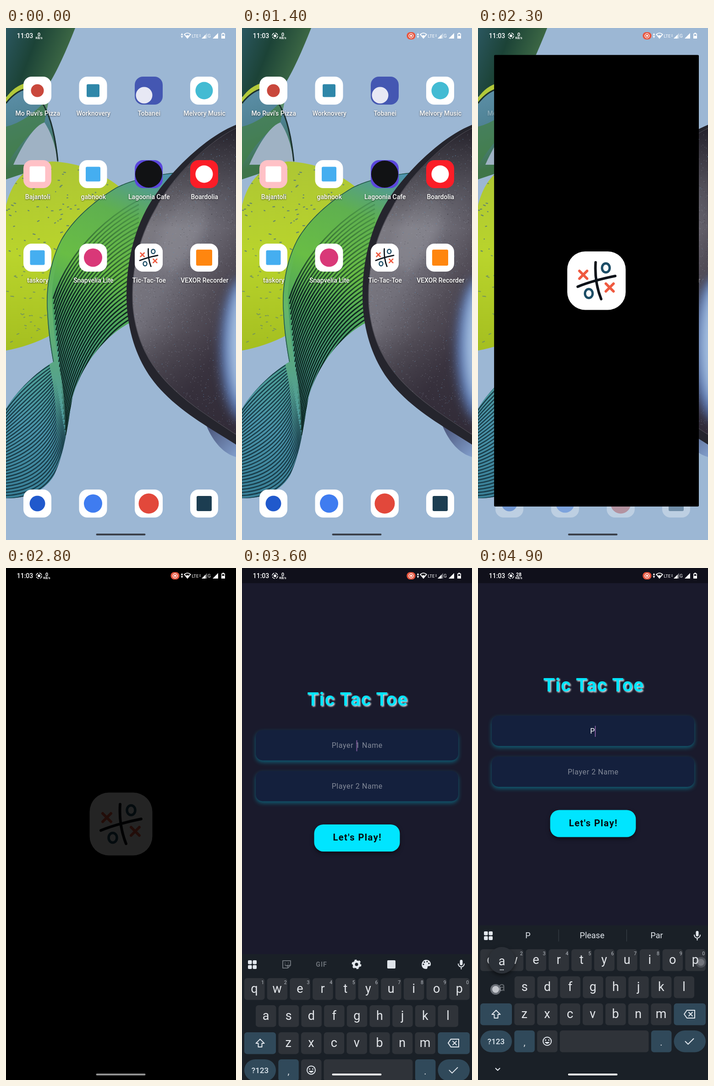
Recreate the animation shown at these times as an HTML page. Size 502 by 1116 pixels, loop 5 s.

```html
<!DOCTYPE html>
<html lang="en">
<head>
<meta charset="utf-8">
<title>Phone screen</title>
<style>
html, body { margin: 0; width: 100%; height: 100%; overflow: hidden; background: #000; }
svg { display: block; width: 502px; height: 1116px; font-family: Roboto, "Noto Sans", sans-serif; }
text { text-anchor: middle; }
.label { font-size: 14px; font-weight: 500; fill: #fff; filter: drop-shadow(0 1px 1.5px rgba(0,0,0,.65)); }
.hint { font-size: 16px; letter-spacing: .6px; fill: #838a99; }
.title { font-size: 40px; font-weight: 700; letter-spacing: 1.6px; filter: drop-shadow(2.5px 2.5px 1.5px rgba(255,255,255,.85)); }
.glow { filter: drop-shadow(0 4px 5px rgba(0,190,220,.42)); }
.raised { filter: drop-shadow(0 4px 4px rgba(0,0,0,.5)); }
.key { font-size: 27px; fill: #e3e6ea; }
.line { fill: none; stroke: #e3e8ee; stroke-width: 2; stroke-linejoin: round; stroke-linecap: round; }
.dim { opacity: .4; }
</style>
</head>
<body>
<svg id="stage" viewBox="0 0 502 1116"></svg>
<script>
const stage = document.getElementById('stage');
const LOOP = 5000, STEP = 100;
const COLS = [68.5, 190, 311.5, 432.5];
const KB_TOP = 779, KB_HEIGHT = 337, NAV_TOP = 1091;

const clamp = v => Math.min(1, Math.max(0, v));
const mix = (a, b, p) => a + (b - a) * p;
const span = (t, from, to) => clamp((t - from) / (to - from));
const easeOut = p => 1 - (1 - p) ** 3;
const range = (n, f) => Array.from({ length: n }, (_, i) => f(i));

let seed = 11;
const rand = () => (seed = (seed * 16807) % 2147483647) / 2147483647;

const rect = (x, y, w, h, r, fill, extra = '') =>
  `<rect x="${x}" y="${y}" width="${w}" height="${h}" rx="${r}" fill="${fill}" ${extra}/>`;
const circle = (x, y, r, fill, extra = '') =>
  `<circle cx="${x}" cy="${y}" r="${r}" fill="${fill}" ${extra}/>`;
const ellipse = (x, y, rx, ry, fill, extra = '') =>
  `<ellipse cx="${x}" cy="${y}" rx="${rx}" ry="${ry}" fill="${fill}" ${extra}/>`;
const path = (d, fill, extra = '') => `<path d="${d}" fill="${fill}" ${extra}/>`;
const stroke = (d, color, width, extra = '') =>
  `<path d="${d}" fill="none" stroke="${color}" stroke-width="${width}" ${extra}/>`;
const line = (d, extra = '') => `<path class="line" d="${d}" ${extra}/>`;
const text = (x, y, s, cls = '', extra = '') => `<text x="${x}" y="${y}" class="${cls}" ${extra}>${s}</text>`;
const group = (id, body, extra = '') => `<g id="${id}" ${extra}>${body}</g>`;
const gradient = (id, x1, y1, x2, y2, ...colors) =>
  `<linearGradient id="${id}" gradientUnits="userSpaceOnUse" x1="${x1}" y1="${y1}" x2="${x2}" y2="${y2}">` +
  colors.map((c, i) => `<stop offset="${i / (colors.length - 1)}" stop-color="${c}"/>`).join('') +
  '</linearGradient>';
const clip = (id, d) => `<clipPath id="${id}"><path d="${d}"/></clipPath>`;

// Short dashes scattered over a box, joined in one path
const specks = (n, x, y, w, h, size) => range(n, () => {
  const s = size * (.5 + rand());
  return `M${(x + rand() * w).toFixed(1)} ${(y + rand() * h).toFixed(1)}l${s.toFixed(1)} ${((rand() - .5) * s).toFixed(1)}`;
}).join('');

function wallpaper() {
  const lime = 'M0 388C10 345 35 298 100 291C160 293 210 315 255 352L255 600L100 668C70 685 30 698 0 703Z';
  const crest = 'M372 315C320 320 270 332 240 348C190 378 145 418 120 462C95 510 86 570 90 620C92 665 98 700 103 728';
  const ribbon = crest + 'C65 750 20 795 0 830L0 1025C45 1026 85 1010 105 975C128 925 134 870 145 805C160 750 205 675 275 640L330 400Z';
  const shell = 'M502 211C430 240 345 325 306 396C272 460 259 540 264 610C270 688 300 752 345 796C390 842 450 875 502 908Z';
  const face = 'M502 219C440 249 361 327 326 395C288 460 272 535 277 608C284 683 314 735 356 777C400 822 455 854 502 886Z';

  const upper = range(28, i => {
    const u = i / 27;
    return `M290 ${mix(375, 634, u)}C${mix(215, 205, u)} ${mix(415, 672, u)} ${mix(135, 152, u)} ${mix(490, 775, u)} ${mix(103, 131, u)} ${mix(590, 900, u)}`;
  }).join('');
  const lower = range(30, i => {
    const u = i / 29;
    return `M${mix(103, 130, u)} ${mix(730, 890, u)}C${mix(70, 120, u)} ${mix(750, 975, u)} ${mix(25, 80, u)} ${mix(785, 1025, u)} -4 ${mix(832, 1026, u)}`;
  }).join('');

  return `<defs>
    ${gradient('topLeaf', 0, 0, 130, 50, '#2b5760', '#1c4337', '#3b6644')}
    ${gradient('blueLeaf', 20, 140, 70, 290, '#5b8ea6', '#4d8091', '#3f7549')}
    ${gradient('limeFill', 60, 290, 60, 700, '#adc634', '#b9d42c', '#a5bf20')}
    ${gradient('ribbonFill', 350, 310, 60, 1010, '#4c91b4', '#5fb04f', '#69bd45', '#479f62', '#4d9f95', '#4a93a9', '#3b8198')}
    ${gradient('stripe', 290, 400, 230, 610, '#1c552b44', '#173f2699', '#0e2822')}
    ${gradient('edge', 100, 450, 100, 920, '#62b95100', '#66b768', '#56a38a', '#4d9aa000')}
    ${gradient('shellFill', 280, 500, 500, 650, '#7b7981', '#72707a', '#544f59', '#3f3844')}
    ${gradient('shellShade', 400, 215, 400, 880, '#24212a', '#24212a00', '#24212a00', '#2b2532aa')}
    ${gradient('drop', 440, 870, 502, 930, '#4c577c', '#7f9bc8')}
    ${clip('limeClip', lime)}${clip('ribbonClip', ribbon)}${clip('shellClip', face)}
    <filter id="soft" x="-60%" y="-30%" width="220%" height="160%"><feGaussianBlur stdDeviation="11"/></filter>
  </defs>` +
    rect(0, 0, 502, 1116, 0, '#9cb7d4') +
    path('M0 0H151C132 48 112 94 90 128L0 150Z', 'url(#topLeaf)') +
    path('M0 152Q18 126 44 120L78 150L0 185Z', '#b3c93a') +
    path('M0 166Q20 138 45 132C90 150 108 220 114 292L0 330Z', 'url(#blueLeaf)') +
    path('M0 215Q45 205 95 150L84 205Q40 235 0 300Z', '#437f47', 'opacity=".75"') +
    path('M16 298C35 255 62 212 84 206C100 230 110 262 113 298Z', '#9fb2c4') +
    stroke('M0 164Q20 138 45 132C90 152 106 220 113 290', '#1c302e', 3) +
    path(lime, 'url(#limeFill)') +
    `<g clip-path="url(#limeClip)">` +
    stroke(specks(100, 0, 295, 240, 200, 4), '#66876a', 2.2) +
    stroke(specks(55, 0, 490, 110, 200, 4), '#66876a', 2, 'opacity=".75"') + '</g>' +
    path(ribbon, 'url(#ribbonFill)') +
    `<g clip-path="url(#ribbonClip)">` +
    stroke(upper, 'url(#stripe)', 3) + stroke(lower, '#12303a', 2.6, 'opacity=".85"') +
    stroke('M120 462C95 510 86 570 92 620C94 665 100 700 106 740Q122 810 120 920', 'url(#edge)', 20) +
    stroke(crest, '#24554a', 3) + '</g>' +
    path('M438 868L502 900V935C475 928 452 902 438 868Z', 'url(#drop)') +
    path(shell, '#25252d') +
    path(face, 'url(#shellFill)', 'stroke="#55535c" stroke-width="1.5"') +
    `<g clip-path="url(#shellClip)">` +
    ellipse(385, 440, 42, 95, '#92919a', 'opacity=".5" transform="rotate(25 385 440)" filter="url(#soft)"') +
    rect(260, 210, 242, 700, 0, 'url(#shellShade)') +
    stroke(specks(1500, 270, 215, 232, 670, 1), '#aeb6c6', 1, 'opacity=".5"') +
    stroke(specks(900, 270, 215, 232, 670, 1.1), '#2b2a33', 1, 'opacity=".55"') +
    stroke(specks(350, 270, 215, 232, 670, 1.2), '#5a8db0', 1.1, 'opacity=".8"') +
    ellipse(522, 700, 54, 160, '#5874ad', 'filter="url(#soft)"') +
    ellipse(524, 690, 38, 135, '#a4bfe0', 'filter="url(#soft)"') + '</g>';
}

// Game icon, drawn around its centre in a 137 px tile
const board = () => {
  const cross = (x, y) => `M${x - 9} ${y - 9}l18 18m0 -18l-18 18`;
  const ring = (x, y) => ellipse(x, y, 9, 10.5, 'none', 'stroke="#1c4d66" stroke-width="5.5"');
  return rect(-68.5, -68.5, 137, 137, 42, '#fff') +
    stroke('M-2 -43Q-5 3 11 43M-44 14Q-10 0 44 -11', '#0c1219', 6, 'stroke-linecap="round"') +
    stroke(cross(-31, -14) + cross(31, 16), '#ef5a40', 6, 'stroke-linecap="round"') + ring(22, -30) + ring(-18, 30);
};

function homeIcons() {
  const dot = (r, fill, dx = 0, dy = 0) => (x, y) => circle(x + dx, y + dy, r, fill);
  const block = (s, fill) => (x, y) => rect(x - s / 2, y - s / 2, s, s, 3, fill);
  const apps = [
    ["Mo Ruvi's Pizza", '#fff', dot(14, '#c9483c')],
    ['Worknovery', '#fff', block(28, '#2f87a9')],
    ['Tobanei', '#4457b2', dot(18, '#e7e8f4', -10, 10)],
    ['Melvory Music', '#fff', dot(19, '#43bbd3')],
    ['Bajantoli', '#ffc1c6', block(34, '#fff')],
    ['gabnook', '#fff', block(32, '#45aef0')],
    ['Lagoonia Cafe', '#5a46dc', dot(29.5, '#111214')],
    ['Boardolia', '#fb1d27', dot(19, '#fff')],
    ['taskory', '#fff', block(32, '#45aef0')],
    ['Snapvelia Lite', '#fff', dot(20, '#d93878')],
    ['Tic-Tac-Toe', '#fff', (x, y) => `<g transform="translate(${x} ${y}) scale(.445)">${board()}</g>`],
    ['VEXOR Recorder', '#fff', block(35, '#ff860f')],
    ['', '#fff', dot(17, '#2059cc')],
    ['', '#fff', dot(20, '#3f7cf0')],
    ['', '#fff', dot(22, '#e2483b')],
    ['', '#fff', block(33, '#1c3d51')],
  ];
  return apps.map(([name, tile, mark], i) => {
    const x = COLS[i % 4], y = [136.5, 318.5, 500.5, 1036.5][i >> 2];
    return rect(x - 30.5, y - 30.5, 61, 61, 18, tile) + mark(x, y) + text(x + .8, y + 54.5, name, 'label');
  }).join('');
}

const statusBar = () =>
  text(41.5, 22, '11:03', '', 'font-size="14" font-weight="500"') +
  group('cast', circle(72, 17, 3, '#fff') + circle(72, 17, 6, 'none', 'stroke="#fff" stroke-width="1.4" stroke-dasharray="7 2.4"')) +
  group('net', text(0, 17.5, '0', '', 'id="speed" font-size="10.5" font-weight="700"') + text(0, 24, 'KB/s', '', 'font-size="7" font-weight="700"')) +
  group('rec', rect(359.5, 9, 19, 16, 7.5, '#e8563f') + circle(369, 17, 2.2, '#fff') +
    circle(369, 17, 4.8, 'none', 'stroke="#fff" stroke-width="1.3"')) +
  path('M381.5 15.5L384 11L386.5 15.5ZM381.5 17.5L384 22L386.5 17.5Z', '#fff') +
  path('M388 14Q396 6.5 404 14L396 23.5ZM390.5 14L393 16.8Q396 14.5 399 16.8L401.5 14Q396 9.5 390.5 14Z', '#fff', 'fill-rule="evenodd"') +
  text(413, 21, 'LTE', '', 'font-size="9.5"') + path('M422 16l1.5 -3l1.5 3ZM422 17l1.5 3l1.5 -3Z', '#fff', 'opacity=".7"') +
  path('M427 23L439 11V23Z', '#fff', 'opacity=".4"') + path('M427 23L435.5 14.5V23Z', '#fff') +
  text(443.5, 21, 'G', '', 'font-size="10"') + path('M451 23L463 11V23Z', '#fff') +
  path('M470 12h2v-1.5h4v1.5h2v11h-8ZM471.5 13.5v3.5h5v-3.5Z', '#fff', 'fill-rule="evenodd"');

const appScreen = () =>
  rect(0, 0, 502, 1116, 0, '#1a1a2c', 'id="appBg"') + rect(0, 0, 502, 33, 0, '#000', 'opacity=".38"') +
  rect(0, NAV_TOP, 502, 25, 0, '#000') +
  group('form',
    text(252.5, 425, 'Tic Tac Toe', 'title', 'id="heading"') +
    rect(30, 478, 442, 66, 15, '#14203d', 'class="glow"') + rect(30, 567, 442, 66, 15, '#14203d', 'class="glow"') +
    text(251.3, 517, '', 'hint', 'id="name"') + text(251.3, 606, 'Player 2 Name', 'hint') +
    rect(249.5, 500, 2, 24, 0, '#7b5896', 'id="caret"') +
    rect(157.5, 683.5, 187, 59, 20, '#00e5ff', 'id="play" class="raised"') +
    text(251.8, 719, "Let's Play!", '', 'font-size="20" font-weight="700" letter-spacing="1.5" fill="#05080c"'));

const ROWS = [['qwertyuiop', 5, 831], ['asdfghjkl', 30, 890], ['zxcvbnm', 79.3, 949]];
const PITCH = 49.7;

function keyboard() {
  const key = (x, y, w, fill = '#2f3339', r = 6) => rect(x, y, w, 47.5, r, fill);
  const special = '#30495a', ink = '#e3e8ee';
  const letters = ROWS.map(([row, x0, y]) => [...row].map((c, i) => {
    const x = x0 + PITCH * i;
    return `<g id="key-${c}">${key(x, y, 44.5)}</g>` + text(x + 22, y + 32, c, 'key', `data-letter="${c}"`) +
      (y < 840 ? text(x + 40, y + 13, (i + 1) % 10, '', 'font-size="10.5" fill="#b9bec5"') : '');
  }).join('')).join('');
  const grid = [[13, 792], [23.5, 792], [13, 802.5], [23.5, 802.5]].map(([x, y]) => rect(x, y, 8.5, 8.5, 2, ink)).join('');
  const gear = circle(250, 801, 6, 'none', `stroke="${ink}" stroke-width="5"`) +
    circle(250, 801, 9, 'none', `stroke="${ink}" stroke-width="3" stroke-dasharray="4.7 4.72"`);
  const palette = path('M402 791C390 791 388 811 402 811C406 811 404 806 406 805C409 804 412 806 412 800C412 795 408 791 402 791Z', ink) +
    [[396, 801], [398, 796], [404, 795], [408, 799]].map(([x, y]) => circle(x, y, 1.6, '#1a2027')).join('');
  const tools = `<g class="dim">${line('M89 793h17v10l-6 6h-11zM100 809v-6h6M94 798h.1M101 798h.1M94 802q3 4 5 1')}` +
    text(173.5, 806, 'GIF', '', `font-size="14" font-weight="700" fill="${ink}" letter-spacing="1"`) + '</g>' +
    gear + rect(317, 792, 18, 18, 2, '#dfe4ea') + palette;
  const words = [['P', 109], ['Please', 249], ['Par', 390]].map(([w, x]) => text(x, 807, w, '', `font-size="18" fill="${ink}"`)).join('') +
    rect(175.5, 788, 1, 26, 0, '#3d444c') + rect(324, 788, 1, 26, 0, '#3d444c');

  return rect(0, KB_TOP, 502, KB_HEIGHT + 2, 0, '#1a2027') + grid + group('tools', tools) + group('words', words) +
    rect(475.5, 791, 6, 12, 3, ink) + line('M472 800a6.5 6.5 0 0 0 13 0M478.5 807v4') + letters +
    key(5, 949, 69, special) + line('M39.5 964l-9 9h5v8h8v-8h5z') +
    key(427.5, 949, 69.5, special) + line('M456 964h17v17h-17l-6 -8.5zM460 968.5l8 8m0 -8l-8 8') +
    key(5, 1008, 69, special, 24) + text(39.5, 1038, '?123', '', 'font-size="17" font-weight="500" fill="#dce6ee"') +
    key(79.3, 1008, 44.5, special) + text(101.5, 1041, ',', 'key', 'style="font-size:20px"') +
    key(129, 1008, 44.5) + circle(151, 1031.5, 9, 'none', `stroke="${ink}" stroke-width="2"`) +
    circle(147.5, 1029, 1.5, ink) + circle(154.5, 1029, 1.5, ink) + path('M145.5 1033h11q-5.5 8 -11 0Z', ink) +
    key(178.5, 1008, 194) + key(378, 1008, 44.5, special) + text(400, 1041, '.', 'key', 'style="font-size:20px"') +
    key(427.5, 1008, 69.5, special, 24) + line('M452.5 1032l6 6l12 -12') + line('M38.5 1090.5l4.5 4.5l4.5 -4.5') +
    group('popup', circle(0, 0, 29, '#2b3037', 'class="raised"') + text(0, 11, '', 'key', 'id="popupLetter"') +
      text(0, 22, '…', '', `font-size="14" font-weight="700" fill="${ink}"`));
}

const touchDot = id => group(id, circle(0, 0, 11.5, '#b9bdc6', 'opacity=".55"') + circle(0, 0, 7.5, '#e8eaf0', 'opacity=".85"'));

stage.innerHTML = wallpaper() + group('icons', homeIcons()) +
  group('launch', rect(0, 0, 0, 0, 0, '#000', 'id="window"') + group('splash', board())) +
  group('app', appScreen()) + group('keyboard', keyboard()) +
  rect(196.5, 1102, 108, 4, 2, '#3b414b', 'id="pill"') +
  group('status', statusBar(), 'fill="#fff"') + touchDot('touchA') + touchDot('touchB');

const $ = Object.fromEntries([...stage.querySelectorAll('[id]')].map(el => [el.id, el]));
const letterTexts = [...stage.querySelectorAll('[data-letter]')];
const set = (el, attrs) => { for (const k in attrs) el.setAttribute(k, attrs[k]); };
const show = (el, visible) => set(el, { opacity: Number(visible) });
const move = (el, x, y, scale = 1) => set(el, { transform: `translate(${x} ${y}) scale(${scale})` });
const place = (el, x, y, opacity) => { move(el, x, y); show(el, opacity); };

function drawLaunch(t) {
  const p = easeOut(span(t, 2100, 2500));
  show($.launch, t > 2100);
  show($.icons, 1 - span(t, 2100, 2400));
  set($.window, { x: mix(281, 0, p), y: mix(470, 0, p), width: mix(61, 502, p), height: mix(61, 1116, p), rx: mix(18, 0, p) });
  move($.splash, mix(311.5, 251, p), mix(500.5, 558, p), mix(.445, 1, p));
  show($.splash, t < 2700 ? 1 : t < 2800 ? .5 : t < 2900 ? .14 : 0);
}

function drawApp(t) {
  const accent = t < 3100 ? '#49d9f1' : '#00e5ff';
  const typed = t >= 4700;
  show($.app, t < 2900 ? 0 : t < 3000 ? .5 : 1);
  set($.appBg, { fill: t < 3100 ? '#191926' : '#1a1a2c' });
  set($.heading, { fill: accent });
  set($.play, { fill: accent });

  const offset = KB_HEIGHT * (1 - easeOut(span(t, 3300, 4000)));
  show($.keyboard, t > 3300);
  move($.keyboard, 0, offset);
  move($.form, 0, -Math.max(0, NAV_TOP - KB_TOP - offset) / 2);

  $.name.textContent = typed ? 'P' : 'Player 1 Name';
  set($.name, { style: typed ? 'fill:#fff' : '', x: typed ? 250 : 251.3 });
  set($.caret, { x: typed ? 255 : 249.5 });
  show($.caret, t < 3300 ? 0 : t < 4300 ? 1 - span(t, 3800, 4050) : typed ? 1 : span(t, 4250, 4500));
}

function drawTyping(t) {
  const upper = t >= 4400 && t < 4700;
  for (const el of letterTexts) {
    const c = el.dataset.letter;
    el.textContent = upper ? c.toUpperCase() : c;
    show(el, c === 'a' && t >= 4900 ? .35 : 1);
  }
  show($['key-a'], t < 4900);
  show($.tools, t < 4800);
  show($.words, t >= 4800);
  const pressP = t === 4600, pressA = t >= 4900;
  place($.popup, pressA ? 52 : 472, pressA ? 855 : 797, pressP || pressA);
  $.popupLetter.textContent = pressA ? 'a' : 'P';
}

function drawTouches(t) {
  if (t >= 4900) place($.touchA, 38.5, 918.5, .9);
  else if (t >= 3200) place($.touchA, 251, 514, t < 3300 ? .5 : 0);
  else place($.touchA, 325, 518, t === 2000 ? .35 : t === 2100 ? .6 : 0);
  place($.touchB, 486.5, 859.5, t < 4600 ? 0 : .8 - span(t, 4700, 4900) * .4);
}

function drawStatus(t) {
  const recording = t >= 200;
  show($.cast, recording);
  show($.rec, recording);
  move($.net, recording ? 89 : 72, 0);
  $.speed.textContent = t >= 4300 ? '28' : '0';
  set($.pill, { fill: t < 2400 ? '#3b414b' : t < 3000 ? '#909090' : t < 3300 ? '#b6b6b6' : '#fff' });
}

function draw(time) {
  const t = Math.floor((time % LOOP) / STEP) * STEP;
  drawLaunch(t);
  drawApp(t);
  drawTyping(t);
  drawTouches(t);
  drawStatus(t);
}

let start;
function tick(now) {
  start ??= now;
  draw(now - start);
  requestAnimationFrame(tick);
}
draw(0);
requestAnimationFrame(tick);
</script>
</body>
</html>
```
